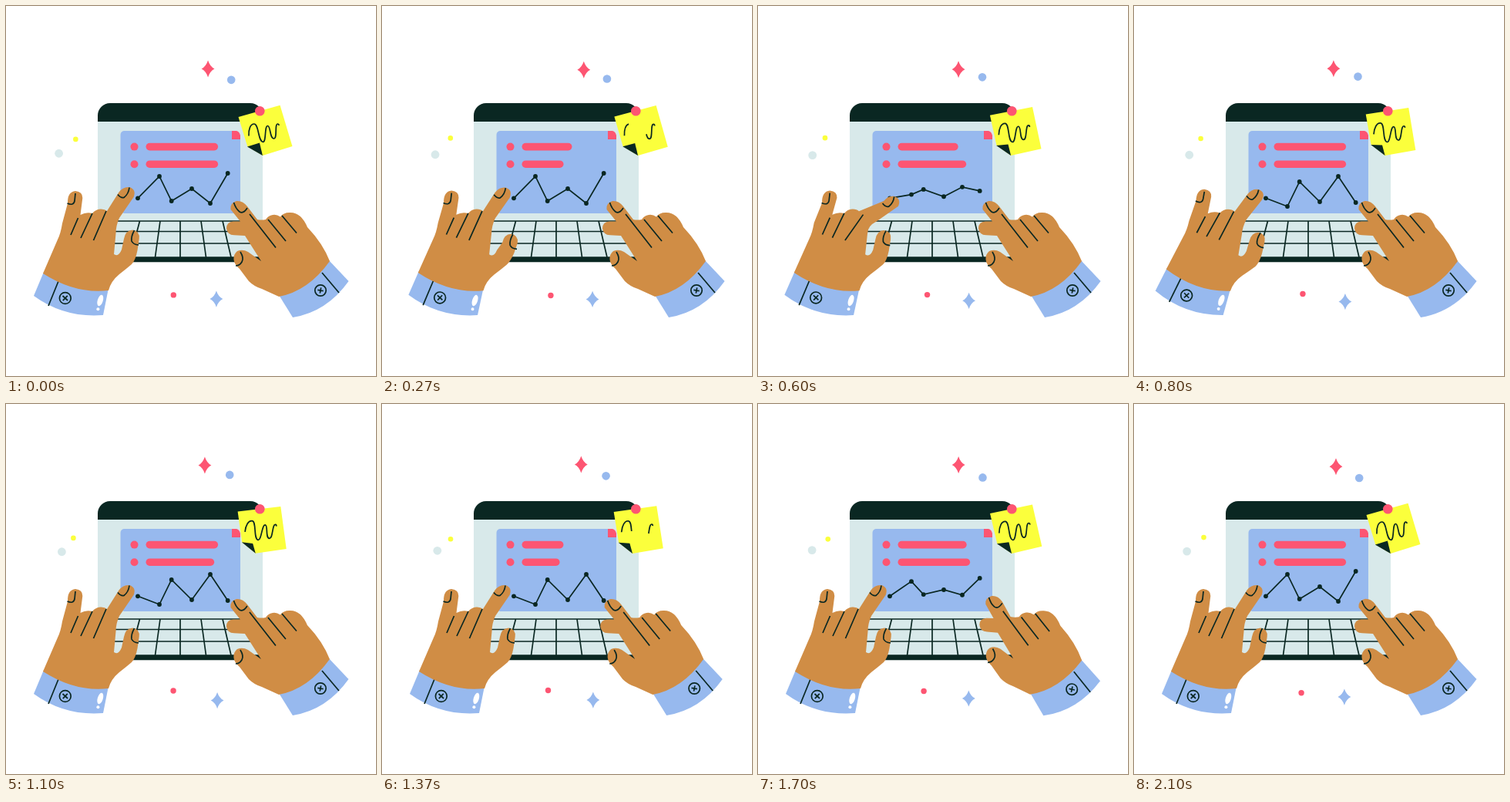
An HTML page for the animation above (2130 ms loop, 480 px wide and 480 px high).

```html
<!DOCTYPE html>
<html lang="en">
<head>
<meta charset="utf-8">
<title>Typing hands</title>
<style>
  html, body { margin: 0; width: 100%; height: 100%; overflow: hidden; background: #fff; }
  svg { display: block; width: 100%; height: 100%; }
  .ink { fill: #0a2722; }
  .line { fill: none; stroke: #0a2722; stroke-width: 1.7; }
  .red { fill: #fd5572; }
  .bar { stroke: #fd5572; stroke-width: 9.6; stroke-linecap: round; }
  .blue { fill: #97b9ee; }
  .pale { fill: #d8e9ea; }
  .yellow { fill: #fbff3c; }
  .skin { fill: #d08d45; }
</style>
</head>
<body>
<svg viewBox="0 0 480 480">
  <g id="laptop">
    <path class="pale" d="M119 149H333V329H119Z"/>
    <path class="ink" d="M119 150V142A16 16 0 0 1 135 126H317A16 16 0 0 1 333 142V150Z"/>
    <path class="ink" d="M130 325.3H332V332.3H130Z"/>
    <rect class="blue" x="148.5" y="162" width="155.5" height="107" rx="5"/>
    <path class="pale" d="M297 161H305V169Z"/>
    <path class="red" d="M293 162H299Q303 163 304 168V173H293Z"/>
    <path class="line" d="M134 279H320M134 292.5H325M134 308H330M173.5 279L161 326M200 279L193.5 326M226 279V326M253 279L259.5 326M281 279L292 326"/>
    <circle class="red" cx="166.5" cy="182.6" r="5"/>
    <circle class="red" cx="166.5" cy="205.2" r="5"/>
    <line class="bar" id="bar1" x1="186.3" y1="182.6" y2="182.6"/>
    <line class="bar" id="bar2" x1="186.3" y1="205.2" y2="205.2"/>
    <polyline class="line" id="chart"/>
    <g id="dots" class="ink"></g>
  </g>

  <g id="note">
    <path class="yellow" d="M301.5 144L355.5 128.7L371.5 182L333 194L313.3 182.3Z"/>
    <path class="ink" id="fold"/>
    <path class="line" id="scribble" pathLength="1" d="M315 168.5C314.5 160 317 153 322 153C328 153 327 176 333.5 176.3C338 176.3 335 155.5 339.5 155.5C343.5 155.5 342 172 347.5 172C352.5 172 348 153 352.5 153Q354 153 354 155"/>
  </g>
  <circle class="red" cx="329.3" cy="136.2" r="6.3"/>

  <g id="left">
    <path class="blue" d="M49 345L36 376Q76 405 126 401L133 366Z"/>
    <path class="line" d="M68 357L55 389"/>
    <g class="line" transform="translate(76.8 379)"><circle r="7.4"/><path d="M-3.3-3L3.3 3M-3 3.2L3-3.2"/></g>
    <ellipse cx="122.3" cy="382" rx="3.5" ry="7.5" transform="rotate(17 122.3 382)" fill="#fff"/>
    <circle cx="119.4" cy="393.3" r="2" fill="#fff"/>
    <path class="skin" id="leftSkin"/>
    <path class="line" id="leftLines"/>
  </g>

  <g id="right">
    <path class="blue" d="M419 330L444.5 357Q416 397 372 404L354 375Z"/>
    <path class="line" d="M410 346L432 372"/>
    <g class="line" transform="translate(408 369)"><circle r="7.2"/><path d="M-3.7-.7L3.7 .7M.7-3.7L-.7 3.7"/></g>
    <path class="skin" id="rightSkin"/>
    <path class="line" id="rightLines"/>
  </g>

  <g id="bits"></g>
</svg>
<script>
const LOOP = 2130, FRAMES = 64, HALF = 32;
const NS = 'http://www.w3.org/2000/svg';
const $ = id => document.getElementById(id);
const mix = (a, b, k) => a + (b - a) * k;
const clamp = v => Math.max(0, Math.min(1, v));
const ease = v => (1 - Math.cos(Math.PI * clamp(v))) / 2;
const rad = deg => deg * Math.PI / 180;

function add(parent, tag, attrs) {
  const el = document.createElementNS(NS, tag);
  for (const name in attrs) el.setAttribute(name, attrs[name]);
  return parent.appendChild(el);
}

// Eased value through [frame, value] keys.
function track(f, keys) {
  if (f <= keys[0][0]) return keys[0][1];
  for (let i = 1; i < keys.length; i++) {
    const [f0, v0] = keys[i - 1], [f1, v1] = keys[i];
    if (f <= f1) return mix(v0, v1, ease((f - f0) / (f1 - f0)));
  }
  return keys[keys.length - 1][1];
}

// Point writer that shifts by (dx, dy), weighted by k.
const shift = (dx, dy) => (x, y, k = 1) => `${x + dx * k} ${y + dy * k} `;

// Floating bits: centre, x swing and phase, y swing and phase.
const star = (w, h) => {
  const a = w * .3, b = h * .28;
  return `M0 ${-h}Q${a} ${-b} ${w} 0Q${a} ${b} 0 ${h}Q${-a} ${b} ${-w} 0Q${-a} ${-b} 0 ${-h}Z`;
};
const bits = [
  { cls: 'red', star: [8.4, 11], x: [260, 2.1, -13], y: [80.6, 2.2, -65] },
  { cls: 'blue', star: [8.4, 10.6], x: [273.5, .6, 180], y: [382.3, 2.3, 170] },
  { cls: 'blue', r: 5.3, x: [291.2, 1, 0], y: [93.8, 2.3, 28] },
  { cls: 'yellow', r: 3.3, x: [88.8, 2.2, 45], y: [173.3, 2.3, 100] },
  { cls: 'pale', r: 5.4, x: [70.5, 1.9, 175], y: [191.6, 2, -100] },
  { cls: 'red', r: 3.7, x: [217.3, 2.3, -90], y: [373.5, 2, -45] }
];
for (const b of bits) {
  b.el = b.star
    ? add($('bits'), 'path', { class: b.cls, d: star(...b.star) })
    : add($('bits'), 'circle', { class: b.cls, r: b.r });
}

const chartX = [171, 199, 214.7, 241, 265, 287.7];
const chartA = [249.3, 221, 253, 237, 256, 217];
const chartB = [249.3, 260, 228, 254, 221, 255];
const dots = chartX.map(x => add($('dots'), 'circle', { cx: x, r: 2.9 }));

function drawScreen(f) {
  const h = f % HALF;
  const dip = (mid, span, depth) => 270.3 - depth * clamp(1 - Math.abs(h - mid) / span);
  $('bar1').setAttribute('x2', dip(12.4, 7, 77));
  $('bar2').setAttribute('x2', dip(9.5, 9.5, 47));

  const k = ease((h - 12.9) / 9);
  const mood = f < HALF ? k : 1 - k;
  const ys = chartA.map((y, i) => mix(y, chartB[i], mood));
  $('chart').setAttribute('points', ys.map((y, i) => chartX[i] + ',' + y).join(' '));
  dots.forEach((d, i) => d.setAttribute('cy', ys[i]));
}

function drawNote(f, phase) {
  const swing = (1 - Math.cos(phase - rad(8))) / 2;
  $('note').setAttribute('transform', `rotate(${9.1 * swing} 329.5 136)`);
  $('fold').setAttribute('d', `M313 182.5L${mix(329, 327.4, swing)} ${mix(177.5, 182, swing)}L333 194Z`);
  const h = f % HALF;
  const gone = ease((h - 2.2) / 9), drawn = ease((h - 5.7) / 9);
  $('scribble').setAttribute('stroke-dasharray', `${drawn} ${gone - drawn} 1 0`);
}

function drawLeft(f) {
  const turn = track(f, [[0, 0], [4, 4.2], [8, .8], [18, .8], [24, 4.2], [32, 0]]);
  const thumb = track(f, [[3, 0], [8, 1], [13, 0]]);
  const index = track(f, [[12, 0], [18, 1], [24, 0]]);
  const P = shift(3 * index, 0);
  const I = shift(16.5 * index, 11 * index);
  const T = shift(3.8 * thumb, 4.6 * thumb);

  $('left').setAttribute('transform', `rotate(${turn} 120 260)`);
  $('leftSkin').setAttribute('d',
    `M48 347L67 303Q71 295 73 282L${P(80, 256)}Q${P(79.5, 241)}${P(90, 240)}Q${P(99.5, 241)}${P(99.3, 249)}L96.5 271` +
    `Q104 267 112 269Q116 264 122 263.5Q128 263 131 266L${I(146.5, 241.5)}Q${I(152, 234)}${I(160, 235)}Q${I(169.5, 238)}${I(165.5, 248)}` +
    `L${I(147, 275, .4)}Q142.5 285 142.5 295L140 322Q146 326 150 316L${T(153, 302)}Q${T(155, 291)}${T(164, 290.5)}Q${T(174, 292)}${T(172.7, 302)}` +
    `L${T(170.5, 317, .5)}Q168 330 163 335Q156 341 147 348Q136 357 133 369Q90 374 48 347Z`);
  $('leftLines').setAttribute('d',
    `M${P(79.5, 256)}Q${P(87.5, 259.5)}${P(89, 253)}L${P(90, 243)}` +
    `M${I(145, 244.5)}Q${I(149, 249.5)}${I(153, 248.5)}Q${I(159, 244)}${I(160, 235.5)}` +
    `M${T(166.5, 291)}Q${T(162, 299)}${T(163, 305)}Q${T(165, 309.5)}${T(172, 310)}` +
    `M93.5 275L84 297M112 269L97 301M${I(130, 266, .4)}L113.5 304`);
}

function drawRight(f) {
  const x = track(f, [[32, 0], [41, -2.8], [51, 0], [64, 0]]);
  const lift = track(f, [[41, 0], [51, 1], [64, 0]]);
  const I = shift(1.8 * lift, -2.4 * lift);

  $('right').setAttribute('transform', `translate(${x} 0) rotate(${1.5 * lift} 362 338)`);
  $('rightSkin').setAttribute('d',
    `M420 331Q411 308 391 287Q383 268 369 268Q360 267.5 356 273.5Q351 270 346 271Q340 272 337 277` +
    `Q331 278 326 277L${I(313, 260)}Q${I(307, 252)}${I(299, 253)}Q${I(290, 256)}${I(291.5, 264)}` +
    `L304 279.5L295 279.5Q286 280 286 288.5Q287 297 296 297.3L310 298L331 331L314 319` +
    `Q307 315 300 318Q295 322 295.5 329Q296 335 303 341L315 357Q322 364 332 367L354 377Q392 370 420 331Z`);
  $('rightLines').setAttribute('d',
    `M${I(295.5, 255)}Q${I(298, 263)}${I(303, 267)}Q${I(308, 270)}${I(313, 262)}` +
    `M304 319Q309 327 306 332Q303 337 298 337M316 270L350 313.5M340 277L363 305M358 272L377 294.5`);
}

function draw(now) {
  // Thirty pictures a second, as hand-drawn steps.
  const f = Math.floor((now % LOOP + 4) / LOOP * FRAMES) % FRAMES;
  const phase = f / FRAMES * 2 * Math.PI;
  drawScreen(f);
  drawNote(f, phase);
  drawLeft(f);
  drawRight(f);
  for (const b of bits) {
    const at = ([mid, amp, lag]) => mid + amp * Math.cos(phase + rad(lag));
    b.el.setAttribute('transform', `translate(${at(b.x)} ${at(b.y)})`);
  }
}

const start = performance.now();
function tick() {
  draw(performance.now() - start);
  requestAnimationFrame(tick);
}
tick();
</script>
</body>
</html>
```
